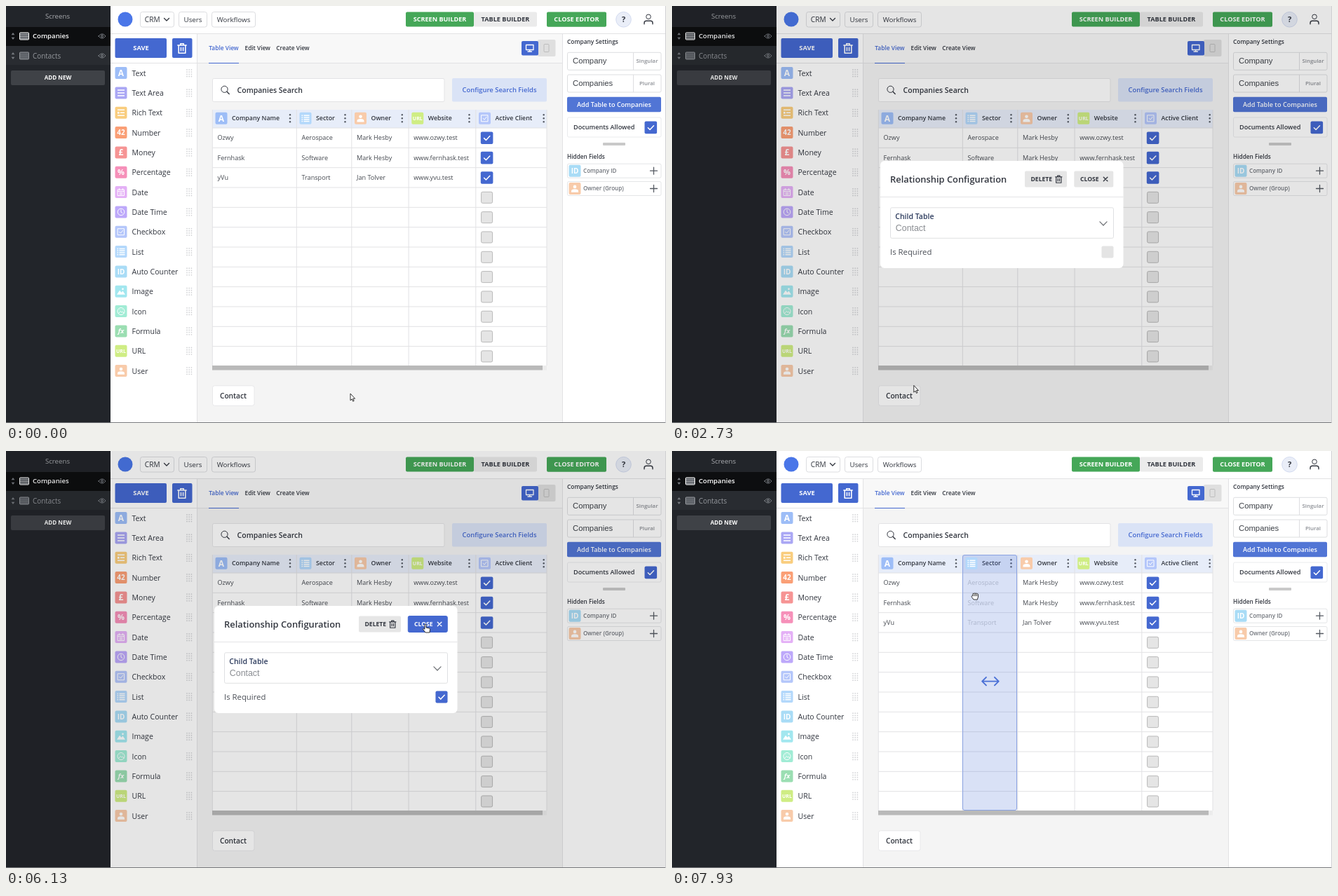
Animation of 941 by 595 pixels, one loop 8 s. Source, as an HTML page:

```html
<!DOCTYPE html>
<html lang="en">
<head>
<meta charset="utf-8">
<title>Screen builder</title>
<style>
  html, body { margin: 0; width: 100%; height: 100%; overflow: hidden; background: #f4f4f4; }
  svg { display: block; width: 941px; height: 595px; }
  text { font-family: "Open Sans", "Noto Sans", sans-serif; white-space: pre; }
  text.input { font-family: "Liberation Sans", Arial, sans-serif; }
</style>
</head>
<body>
<svg id="stage" viewBox="0 0 941 595" xmlns="http://www.w3.org/2000/svg"></svg>
<script>
const BLUE = '#4468d0', GREEN = '#45a758', INK = '#32363f', LINE = '#e2e2e4', GRAY = '#8b8e94';

// ---- drawing helpers: text y is the middle of the capitals ----
const rect = (x, y, w, h, fill, r = 0, stroke = 'none') =>
  `<rect x="${x}" y="${y}" width="${w}" height="${h}" rx="${r}" fill="${fill}" stroke="${stroke}"/>`;
const path = (d, stroke, width = 1, fill = 'none') =>
  `<path d="${d}" stroke="${stroke}" stroke-width="${width}" fill="${fill}" stroke-linecap="round" stroke-linejoin="round"/>`;
const circle = (x, y, r, fill, stroke = 'none') =>
  `<circle cx="${x}" cy="${y}" r="${r}" fill="${fill}" stroke="${stroke}"/>`;
const text = (s, x, y, size, fill = INK, weight = 400, anchor = 'start', cls = '') =>
  `<text x="${x}" y="${(y + size * 0.36).toFixed(2)}" font-size="${size}" fill="${fill}" font-weight="${weight}" text-anchor="${anchor}" class="${cls}">${s}</text>`;
const label = (s, x, y, size, fill, weight = 600) => text(s, x, y, size, fill, weight, 'middle');
const group = (content, attrs) => `<g ${attrs}>${content}</g>`;
const at = (x, y, content) => group(content, `transform="translate(${x} ${y})"`);
const times = (n, make) => Array.from({ length: n }, (_, i) => make(i)).join('');

const tick = (x, y) => path(`M${x - 4} ${y + .3}l2.8 2.8 5.4-5.8`, '#fff', 1.5);
const checkbox = (x, y, on) => on
  ? rect(x - 8.8, y - 8.8, 17.6, 17.6, BLUE, 2) + tick(x, y)
  : rect(x - 8, y - 8, 16, 16, '#e5e5e5', 2, '#b9b9b9');
const trash = (x, y, s, color) => at(x, y, group(
  path('M-5.5-4H5.5M-2-4V-6H2V-4M-4.3-4V6H4.3V-4M-1.4-1V3M1.4-1V3', color, 1.4), `transform="scale(${s})"`));

// ---- field type icons, centred on 0,0 ----
const letter = (s, size) => label(s, 0, 0, size, '#fff', 700);
const lines = '<path d="M-5-4H5M-5 0H5M-5 4H5" stroke="#fff" stroke-width="1.6"/>';
const person = circle(0, -2.6, 2.3, '#fff') + '<path d="M-5 5.2V3.6Q-5 .8 0 .8T5 3.6V5.2z" fill="#fff"/>';
const icons = {
  text: ['#9dbdf7', letter('A', 12)],
  area: ['#aaa7f4', lines],
  rich: ['#f9cd7e', '<path d="M-5-4H5M-1 0H5M-5 4H5" stroke="#fff" stroke-width="1.6"/>' + rect(-5, -1.4, 2.6, 2.8, '#fff')],
  number: ['#fa9f76', letter('42', 10)],
  money: ['#f69494', letter('£', 12)],
  percent: ['#f690b9', letter('%', 11)],
  date: ['#e4b0f6', path('M-4.5-3.5H4.5V5H-4.5zM-4.5-1H4.5M-2.5-5V-3M2.5-5V-3M-2 1.2H2M-2 3.2H2', '#fff')],
  time: ['#bda8fa', circle(0, 0, 4.8, 'none', '#fff') + path('M0-3V.2L2 1.5', '#fff')],
  check: ['#b4c6fa', path('M-4.5-4.5H4.5V4.5H-4.5zM-2.3 0L-.5 1.9 2.6-2', '#fff')],
  list: ['#b3d8fb', '<path d="M-2.5-4H5.5M-2.5-1.3H5.5M-2.5 1.4H5.5M-2.5 4.1H5.5M-5.5-4h1.6M-5.5-1.3h1.6M-5.5 1.4h1.6M-5.5 4.1h1.6" stroke="#fff" stroke-width="1.5"/>'],
  id: ['#a9dcf6', letter('ID', 10)],
  image: ['#a2e7ef', '<path d="M-6 4.5L-2-1.5 .5 1.5 2.5-.8 6 4.5z" fill="#fff"/>' + circle(2.5, -3.4, 1.3, '#fff')],
  icon: ['#a1ecd5', circle(0, 0, 5, 'none', '#fff') + path('M-3.6 3L-.8 0 1 1.6 2.3.6 4 2.6M-1.8-2h.1M1.8-2h.1', '#fff')],
  formula: ['#9bdeb2', group(letter('fx', 9.5), 'font-style="italic"')],
  url: ['#cfed84', letter('URL', 7)],
  user: ['#f8cbaa', person]
};
const icon = (name, x, y) => at(x, y, rect(-8.5, -8.5, 17, 17, icons[name][0], 2) + icons[name][1]);

// ---- page parts ----
function sidebar() {
  const entry = (name, y, color, weight, size) =>
    path(`M7.6 ${y - 1.8}L10 ${y - 5}l2.4 3.2zM7.6 ${y + 1.8}L10 ${y + 5}l2.4-3.2z`, 'none', 0, '#777b81') +
    rect(19.5, y - 5, 13, 10, '#55595f', 1, color) +
    path(`M20 ${y - 2}h12M20 ${y + .5}h12M20 ${y + 3}h12`, color, .5) +
    text(name, 38, y, size, color, weight) +
    path(`M132 ${y}q5-6.5 10 0q-5 6.5-10 0z`, '#85898f', .9) + circle(137, y, 1.5, 'none', '#85898f');
  return rect(0, 0, 149, 595, '#22252a') + rect(0, 30, 149, 27, '#0d0e10') + rect(0, 57, 149, 27, '#292c31') +
    label('Screens', 73.5, 15, 9.7, '#a9abaf', 400) +
    entry('Companies', 43, '#fff', 600, 9.6) + entry('Contacts', 71, '#95989d', 400, 9.9) +
    rect(7, 92, 134, 21, '#3f4247', 2) + label('ADD NEW', 74, 102.5, 8.1, '#fff', 700);
}

function header() {
  const button = (s, x, w, size, tx) => rect(x, 8.5, w, 21.5, '#fff', 3, '#dcdde0') + label(s, tx, 19.3, size, INK, 500);
  return rect(149, 0, 792, 39, '#fff') + rect(149, 39, 792, 1, LINE) +
    circle(170, 19, 10.5, '#4a76e8') +
    button('CRM', 191.5, 48, 10.1, 208.7) + path('M225.5 17.5l3.5 3.5 3.5-3.5', INK, 1.3) +
    button('Users', 246.5, 40, 9.8, 266.5) + button('Workflows', 293.5, 62, 9.8, 324.5) +
    rect(570, 8.5, 97, 21, GREEN, 2) + label('SCREEN BUILDER', 618.5, 19, 9.1, '#fff', 700) +
    rect(667, 8.5, 90, 21, '#ebebeb', 2) + label('TABLE BUILDER', 712, 19, 9.15, INK, 700) +
    rect(771, 8.5, 85, 21.3, GREEN, 2) + label('CLOSE EDITOR', 813.5, 19, 9.2, '#fff', 700) +
    circle(880.5, 19.3, 10.8, '#eaeef8', '#d3dbf0') + label('?', 880.5, 19.3, 11, INK, 700) +
    circle(916, 15.3, 3.3, 'none', INK) + path('M910 25.8v-1.5q0-3 3-3h6q3 0 3 3v1.5', INK, 1.4);
}

function toolbox() {
  const tools = [['text', 'Text'], ['area', 'Text Area'], ['rich', 'Rich Text'], ['number', 'Number'],
    ['money', 'Money'], ['percent', 'Percentage'], ['date', 'Date'], ['time', 'Date Time'],
    ['check', 'Checkbox'], ['list', 'List'], ['id', 'Auto Counter'], ['image', 'Image'],
    ['icon', 'Icon'], ['formula', 'Formula'], ['url', 'URL'], ['user', 'User']];
  return rect(149, 40, 123, 555, '#fff') + rect(272, 40, 1, 555, LINE) + rect(149, 81, 123, 1, LINE) +
    rect(155.5, 46, 73.5, 28, BLUE, 2) + label('SAVE', 192.5, 60, 9.3, '#fff', 700) +
    rect(237, 46, 28.5, 28, BLUE, 2) + trash(251, 60.5, 1.12, '#fff') +
    tools.map(([kind, name], i) => {
      const y = 95.6 + i * 28.33;
      return icon(kind, 164, y) + text(name, 179.5, y + .3, 10.55, INK, 500) +
        times(12, j => circle(258 + j % 3 * 3.2, y - 4.7 + Math.floor(j / 3) * 3.2, .9, '#d3d4d7'));
    }).join('');
}

const columns = [
  { x: 294, end: 414, kind: 'text', name: 'Company Name', cells: ['Ozwy', 'Fernhask', 'yVu'] },
  { x: 414, end: 492.5, kind: 'list', name: 'Sector', cells: ['Aerospace', 'Software', 'Transport'] },
  { x: 492.5, end: 573.8, kind: 'user', name: 'Owner', cells: ['Mark Hesby', 'Mark Hesby', 'Jan Tolver'] },
  { x: 573.8, end: 669.5, kind: 'url', name: 'Website', cells: ['www.ozwy.test', 'www.fernhask.test', 'www.yvu.test'] },
  { x: 669.5, end: 775.7, kind: 'check', name: 'Active Client', cells: [] }
];
const ROW = 28.33;

function table() {
  return rect(294, 148, 477, 365, '#fff') + rect(294, 148, 477, 26, '#e7edf9') +
    times(13, i => rect(294, 173.5 + i * ROW, 477, 1, LINE)) +
    columns.map((c, i) =>
      rect(c.x - .2, 148, 1, 365, LINE) +
      text(c.name, c.x + 28, 160.3, 8.8, INK, 600) +
      times(3, j => circle(c.end - 9, 155.2 + j * 5, 1.2, '#555a64')) +
      group(c.cells.map((s, j) => text(s, c.x + 7.5, 188 + j * ROW, 9.1, '#44484f')).join(''), `id="cells${i}"`)
    ).join('') +
    times(12, i => checkbox(685.6, 188.3 + i * ROW, i < 3)) +
    rect(770.5, 148, 1, 365, LINE) + rect(294, 513, 477, 6.5, '#ececec') + rect(294, 513, 471, 6.5, '#b9b9b9');
}

const columnIcons = () => columns.map(c => icon(c.kind, c.x + 13, 160.3)).join('');

function workspace() {
  return rect(272, 40, 521, 555, '#f4f4f4') + rect(272, 40, 521, 41, '#f8f8f8') + rect(272, 81, 521, 1, LINE) +
    text('Table View', 289.3, 60, 8.35, BLUE, 600) + rect(289, 81, 43, 1, BLUE) +
    text('Edit View', 340.5, 60, 8.3, INK, 600) + text('Create View', 385.3, 60, 8.3, INK, 600) +
    rect(758, 48, 25.5, 24, '#dfdfdf', 2) + rect(735, 50, 24, 20.5, BLUE, 2) +
    path('M741.5 55.5h10.5v7h-10.5zM746.7 62.5v2.5M744 65h5.5', '#fff', 1.3) +
    rect(767, 54.5, 7, 11, 'none', 1, '#bcbcbc') +
    rect(294.5, 103.5, 330.5, 33, '#fff', 2, '#e3e3e5') +
    circle(311.5, 118.8, 4.6, 'none', INK) + path('M315 122.3l3.2 3.2', INK, 1.4) +
    text('Companies Search', 329.6, 119.8, 10.5, INK, 600) +
    rect(636, 103, 135, 33.5, '#dae3f6', 2) + label('Configure Search Fields', 703.5, 119.8, 9.45, BLUE) +
    table() +
    '<g id="contact"><rect x="294.5" y="541.8" width="59.5" height="28.5" rx="3"/>' +
    label('Contact', 324, 556, 10.2, 'currentColor') + '</g>';
}

function settings() {
  const input = (value, note, y) => rect(800.5, y, 133.5, 25, '#fff', 2, '#dddee0') + rect(894, y, 1, 25, '#dddee0') +
    text(value, 808, y + 12, 11.3, '#3c4047', 400, 'start', 'input') + label(note, 914, y + 12.3, 7.9, GRAY);
  const field = (kind, name, y) => rect(800.5, y - 10, 133.5, 20, '#fff', 2, '#e4e5e7') + icon(kind, 811, y) +
    text(name, 823, y, 8.1, '#70747b', 600) + path(`M918.5 ${y}h10M923.5 ${y - 5}v10`, '#555a62', 1.3);
  return rect(793, 40, 148, 555, '#fff') + rect(793, 40, 1, 555, LINE) +
    text('Company Settings', 800, 51.3, 8.4, INK, 600) +
    input('Company', 'Singular', 66.3) + input('Companies', 'Plural', 98) +
    rect(800, 129.7, 134, 21.5, '#5175d5', 2) + label('Add Table to Companies', 867, 140.3, 9.15, '#fff') +
    rect(800.5, 159, 133.5, 28, '#fff', 2, '#eaebed') + text('Documents Allowed', 809, 173, 9.1, INK, 600) +
    checkbox(919.3, 173.4, true) + rect(851, 195, 32, 4, '#c9c9c9', 1) +
    text('Hidden Fields', 800, 214.7, 8.25, INK, 600) +
    field('id', 'Company ID', 235.2) + field('user', 'Owner (Group)', 260.5);
}

function dialog() {
  return rect(297, 221, 346.5, 153, '#fff', 6) + rect(297, 272, 346.5, 1, '#e4e4e6') +
    text('Relationship Configuration', 311, 247.5, 12.9, INK, 600) +
    rect(503, 235.5, 60, 23, '#e6e6e6', 2) + label('DELETE', 526.8, 247, 8.65, INK, 700) + trash(551.3, 247.2, .84, INK) +
    '<g id="close"><rect x="573.3" y="235.5" width="56" height="23" rx="2"/>' +
    label('CLOSE', 595.4, 247, 8.65, 'currentColor', 700) + path('M615.3 244.2l5.6 5.6M620.9 244.2l-5.6 5.6', 'currentColor', 1.3) + '</g>' +
    rect(311.5, 287.8, 318, 43.5, '#fff', 2, '#dfe0e2') +
    text('Child Table', 318.3, 300, 10.5, '#2b3a5c', 600) +
    text('Contact', 318.8, 316.5, 12.4, '#8a8d92', 400, 'start', 'input') +
    path('M610 307.8l5 5.2 5-5.2', '#6a6d72', 1.2) +
    text('Is Required', 311, 351.3, 11.35, '#4b4f57') +
    rect(612.5, 342.5, 17, 17, '#e4e4e4', 2) +
    group(rect(612.5, 342.5, 17, 17, BLUE, 2) + tick(621, 351), 'id="required"');
}

const cursors = {
  arrow: 'M0 0V9.8l2.2-2 1.5 3.3 1.5-.7-1.5-3.2H6.6z',
  hand: 'M-1 1.2C-1-.5 1-.5 1 1.2V5l4 .8c1 .2 1.6.9 1.5 2L6 12H0L-3.2 7.8c-.7-1 .5-2 1.4-1.2L-1 7.4z',
  grab: 'M-3.5-2.5c.3-1.6 1.8-1.6 2-.6 .2-1.5 2-1.5 2.1-.1 .4-1.2 2-1 2 .3 .6-.9 1.9-.6 1.9.6v3.3L3.4 5H-2L-4.6 1.5c-.8-1.2 .2-2.2 1.1-1.5zM-1.5-2.8V.2M.6-3V.2M2.6-2.6V.2'
};

const stage = document.getElementById('stage');
stage.innerHTML = workspace() + toolbox() + settings() + header() + sidebar() +
  '<g id="column"><rect y="148.5" height="364" rx="2.5" fill="#4468d0" fill-opacity=".2" stroke="#8aa2e2"/>' +
  group(path('M-11.5 0H11.5M-6-5.8L-11.8 0l5.8 5.8M6-5.8L11.8 0 6 5.8', '#4a70d6', 1.9), 'id="resize"') + '</g>' +
  columnIcons() +
  group(rect(0, 0, 940, 594, 'rgba(0,0,0,.1)') + dialog(), 'id="modal"') +
  rect(0, 594, 941, 1, '#77797c') + rect(940, 0, 1, 595, '#cfcfd1') +
  '<path id="cursor" fill="#fff" stroke="#1d1d1d" stroke-width=".9" stroke-linejoin="round"/>';
const $ = id => document.getElementById(id);

// ---- motion, on a clock of 15 steps a second ----
const STEPS = 120, STEP_MS = 8000 / STEPS;
const OPEN = 28, CHECK = 68, SHUT = 106;
const legs = [
  { from: 6, to: 18, points: [[491, 553], [342, 554]] },
  { from: 41, to: 53, points: [[342, 554], [395, 300], [575, 263], [596, 343]] },
  { from: 54, to: 57, points: [[596, 343], [621.5, 354]] },
  { from: 83, to: 92, points: [[621.5, 354], [598, 247]] },
  { from: 117, to: 119, points: [[597, 246.5], [432, 207]] }
];
const smooth = p => p * p * (3 - 2 * p);
const mix = (a, b, u) => a.map((v, i) => v + (b[i] - v) * u);
const bezier = (pts, u) => pts.length === 1 ? pts[0] : bezier(pts.slice(1).map((p, i) => mix(pts[i], p, u)), u);

function pointer(step) {
  const leg = legs.filter(l => l.from <= step).pop() || legs[0];
  const p = (step - leg.from + 1) / (leg.to - leg.from + 1);
  return bezier(leg.points, smooth(Math.min(1, Math.max(0, p))));
}

function paint(group, on, fill, ink, stroke) {
  group.firstChild.setAttribute('fill', on ? BLUE : fill);
  group.firstChild.setAttribute('stroke', on ? BLUE : stroke);
  group.setAttribute('color', on ? '#fff' : ink);
}

function draw(step) {
  const [x, y] = pointer(step);
  const modal = step >= OPEN && step < SHUT;
  const onContact = step < OPEN && x < 354;
  const onClose = modal && x > 573 && y < 258.5;
  const onCheck = modal && x > 612 && y > 342;
  const hovered = step >= SHUT ? columns.findIndex(c => x < c.end) : -1;

  $('modal').setAttribute('opacity', modal ? Math.min(1, (step - OPEN + 1) / 6) : 0);
  $('required').setAttribute('opacity', step >= CHECK ? 1 : 0);
  paint($('contact'), onContact, '#fff', INK, '#e8e8ea');
  paint($('close'), onClose, '#e6e6e6', INK, 'none');

  columns.forEach((c, i) => $('cells' + i).setAttribute('opacity', i === hovered ? .3 : 1));
  $('column').setAttribute('visibility', hovered < 0 ? 'hidden' : 'visible');
  if (hovered >= 0) {
    const { x: left, end } = columns[hovered], box = $('column').firstChild;
    const boxLeft = Math.round(left) + .5;
    box.setAttribute('x', boxLeft);
    box.setAttribute('width', Math.floor(end) - .5 - boxLeft);
    $('resize').setAttribute('transform', `translate(${(left + end) / 2 + .7} 328.6)`);
  }

  const shape = hovered >= 0 ? 'grab' : onContact || onClose || onCheck ? 'hand' : 'arrow';
  $('cursor').setAttribute('d', cursors[shape]);
  $('cursor').setAttribute('transform', `translate(${x} ${y})`);
}

const start = performance.now();
function frame() {
  draw(Math.floor((performance.now() - start + 4) / STEP_MS) % STEPS);
  requestAnimationFrame(frame);
}
frame();
</script>
</body>
</html>
```
